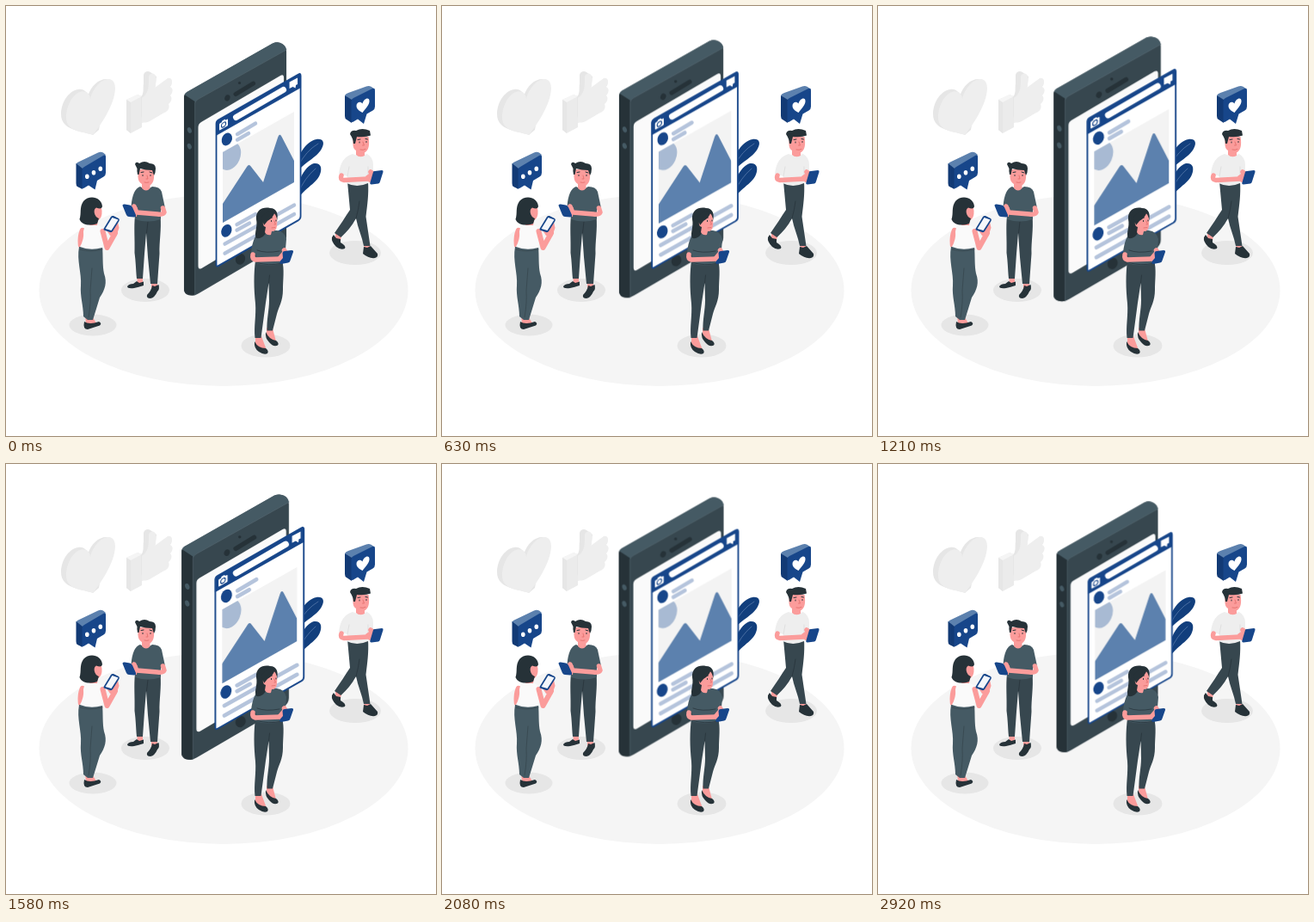
These frames come from a looping animation (500x500 px, 2.96 s). An HTML page:

```html
<!DOCTYPE html>
<html lang="en">
<head>
<meta charset="utf-8">
<title>Social feed</title>
<style>
  html, body { margin: 0; width: 100%; height: 100%; overflow: hidden; background: #fff; }
  svg { display: block; width: 100%; height: 100%; }
  .navy { fill: #17468a; } .blue { fill: #5c81ae; } .pale { fill: #a8bad3; }
  .ink { fill: #263238; } .dark { fill: #37474f; } .slate { fill: #455a64; }
  .skin { fill: #fb9c9b; } .white { fill: #fff; } .shade { fill: #e6e6e6; }
  .line { fill: none; stroke-linecap: round; stroke-linejoin: round; }
  .arm { stroke: #fb9c9b; }
  .bar { stroke: #b5c4dc; stroke-width: 4.4; }
  .face { stroke: #263238; stroke-width: 1; }
  .blush { stroke: #e5716f; stroke-width: .9; }
  .fold { stroke: #263238; stroke-width: .7; }
  #device { transform-origin: 266.5px 185.5px; animation: beat 1.48s linear infinite; }
  @keyframes beat {
    0%    { transform: scale(1); }
    11.8% { transform: scale(1.085); animation-timing-function: ease-in; }
    40.5% { transform: scale(1.025); animation-timing-function: ease-out; }
    57.4% { transform: scale(.992); }
    72.3% { transform: scale(1.069); animation-timing-function: ease-in-out; }
    98.3% { transform: scale(.991); }
    100%  { transform: scale(1); }
  }
</style>
</head>
<body>
<svg viewBox="0 0 500 500">
  <defs>
    <clipPath id="photo"><path d="M252 170 335 123V205L252 252Z"/></clipPath>
  </defs>

  <ellipse cx="253" cy="330.5" rx="214.5" ry="111.5" fill="#f5f5f5"/>
  <g class="shade">
    <ellipse cx="101" cy="371" rx="27.5" ry="12.5"/>
    <ellipse cx="162" cy="330.5" rx="28" ry="13.5"/>
    <ellipse cx="302" cy="395" rx="28.5" ry="13.5"/>
    <ellipse cx="406" cy="287" rx="30" ry="14"/>
  </g>

  <!-- grey heart and thumb -->
  <path d="M64 126C64 111 74 98 84 97 91 96 94 100 95 105 99 92 109 84 118 85L108 144 101 150C88 145 64 145 64 126Z" fill="#e6e6e6"/>
  <path d="M70 130C70 114 79 101 88 99.500 94 98.500 97 102 98 108 101 95 111 85 119 85 126 85 128 92 126.500 101 124 117 112 136 101 150 91 146 70 147 70 130Z" fill="#eee"/>
  <path d="M140 109 153 103 158 105V141L145 148 140 144Z" fill="#ebebeb"/>
  <path d="M140 109 153 103 158 105 145 112Z" fill="#f5f5f5"/>
  <path d="M140 109 145 112V148L140 144Z" fill="#e6e6e6"/>
  <path d="M157 106C161 101 159 95 160 90V80C161 76 165 75 168 77L175 82 173 98 157 130Z" fill="#e6e6e6"/>
  <path d="M158 107C165 102 166 95 166 88V82C167 78 173 77 174 82 175 87 174 92 173 95L188 84C193 82 195 89 191 94 195 96 194 101 191 104 194 107 192 112 189 114 191 118 188 123 184 124L167 134C164 136 161 135 158 136Z" fill="#eee"/>

  <!-- leaves -->
  <g fill="#123f7d">
    <path d="M336 196C337 174 349 157 361 155 369 154 371 159 367 166 361 177 347 181 336 196Z"/>
    <path d="M334 232C337 206 347 186 358 183 366 182 368 188 365 196 360 208 346 211 334 232Z"/>
  </g>
  <path class="line" stroke="#7f9bc4" stroke-width=".5" d="M340 186Q348 169 363 160M340 217Q347 200 360 189"/>

  <g id="device">
    <!-- handset -->
    <path class="dark" d="M207 106Q207 102 211 100L310 43.500Q316 41 321 44 326 47 326 53V268Q326 274 320 278L224 334Q218 338 211 335 207 333 207 329Z"/>
    <path class="slate" d="M207.500 103.500Q208 101 212 99L310 43.500Q316 41 321 44 325 46 326 51L223 108.500Q220 110 219.500 113Z"/>
    <path class="ink" d="M207 106Q207 104 208 103.500L219.500 111V336Q213 337 210 335 207 333 207 329Z"/>
    <path class="line" d="M219.700 336V113Q220 110 224 108L326 51" stroke="#5d6e77" stroke-width=".5"/>
    <g class="slate"><ellipse cx="213.200" cy="144.500" rx="2.400" ry="3.500" transform="rotate(-20 213 144)"/><ellipse cx="213.200" cy="163.200" rx="2.400" ry="3.500" transform="rotate(-20 213 163)"/></g>
    <path d="M223.500 141Q223.500 137 227 135L319 81Q323 79 323 83V248L228 304.500Q223.500 307 223.500 302Z" fill="#fafafa"/>
    <path class="line" d="M267 102.500 287.500 90" stroke="#263238" stroke-width="5"/>
    <g class="ink"><ellipse cx="257.300" cy="106.800" rx="3" ry="3.700" transform="rotate(25 257 107)"/><circle cx="271.500" cy="89.500" r="1.600"/><ellipse cx="272.500" cy="294" rx="5.500" ry="6.500" transform="rotate(25 272 294)"/></g>

    <!-- feed panel -->
    <path d="M244.500 137Q244.500 134 247 132.500L340 79.500Q342.500 78 342.500 81V244.500Q342.500 247.500 340 249L247 302Q244.500 303.500 244.500 300.500Z" fill="#fff" stroke="#17468a" stroke-width="1.800"/>
    <path class="navy" d="M244 136Q244 134 247 132.500L340 79.500Q343 78 343 81V95L244 151Z"/>
    <path class="line" d="M267.500 129.500 322.500 97.500" stroke="#fff" stroke-width="7"/>
    <g transform="matrix(1 -.56 0 1 253 137)">
      <path class="white" d="M-4-3H-2.500L-1.500-4.500H1.500L2.500-3H4Q5-3 5-2V4Q5 5 4 5H-4Q-5 5-5 4V-2Q-5-3-4-3Z"/>
      <circle cy="1" r="2.600" fill="none" stroke="#17468a" stroke-width="1.100"/>
    </g>
    <path class="white" d="M329.500 88.500 339 83.500V91L337 92 336.500 95.500 333.500 94 329.500 96Z"/>
    <ellipse class="navy" cx="256.800" cy="155" rx="5.800" ry="7.700" transform="rotate(24 257 155)"/>
    <path class="line bar" d="M269 149 290 136.500M269 155.500 282 148"/>
    <path d="M252 170 335 123V205L252 252Z" fill="#f3f3f3"/>
    <g clip-path="url(#photo)">
      <ellipse class="pale" cx="260" cy="174.500" rx="12" ry="17" transform="rotate(24 260 175)"/>
      <path class="blue" d="M250 233 280 187Q282.500 183 285 187L299 205 316 153Q318 147 320.500 152L337 184V206L250 254Z"/>
    </g>
    <ellipse class="navy" cx="256.500" cy="261.500" rx="5.800" ry="7.700" transform="rotate(24 257 261)"/>
    <path class="line bar" d="M268.500 254 290 242M268.500 260.500 283 252.500M254.500 276.500 335 231.500M254.500 287.500 335 242"/>
  </g>

  <!-- chat bubble -->
  <path class="blue" d="M81.500 184Q82 182 85 181L107 170.500Q110 169 113 170.500L116 173 89 190Z"/>
  <path d="M81.500 183 89 189V213L83 210Q81.500 209 81.500 206Z" fill="#123a75"/>
  <path class="navy" d="M88.500 191Q88.500 188 91 187L113 174Q116 172 116 175V194Q116 197 113.500 198.500L106 203 103.500 213.500 96 208.500 91 211.500Q88.500 213 88.500 210Z"/>
  <g class="white"><ellipse cx="94.300" cy="198.300" rx="2.300" ry="2.800"/><ellipse cx="102" cy="193.800" rx="2.300" ry="2.800"/><ellipse cx="109.800" cy="189.300" rx="2.300" ry="2.800"/></g>

  <!-- like bubble -->
  <path class="blue" d="M394 104Q395 102 398 101L419 93.500Q422 92.500 425 94L429 97 402 111Z"/>
  <path d="M394 104 402 109V136L396 132Q394 131 394 128Z" fill="#123a75"/>
  <path class="navy" d="M401.500 111Q401.500 108 404 107L426 96Q429 95 429 98V117Q429 120 426.500 121.500L419.500 125.500 416 137 409 131.500 404 134.500Q401.500 136 401.500 133Z"/>
  <path class="white" d="M414.500 124C411 122 407.500 120 407.500 116 407.500 112 412 110 414.500 113.500 416 107.500 422 105.500 422.500 110 423 115 418 119 414.500 124Z"/>

  <!-- woman seen from behind -->
  <path class="line arm" stroke-width="6.500" d="M89 261Q86 268 87 278"/>
  <path class="skin" d="M92 358 93 370 106 370 100 361Z"/>
  <path class="ink" d="M91 367Q97 371 108 367 112 369 109 371.500L95 376Q89 376 91 367Z"/>
  <path class="slate" d="M85 280H112C113 291 112 301 114 311 118 322 115 330 109 339L101 365H95L90 361C90 348 86 338 87 325 88 310 82 296 85 280Z"/>
  <path class="line" stroke="#37474f" stroke-width=".8" d="M96 362Q99 345 98 331L100 305M86 283Q99 287 112 283"/>
  <path d="M92 254Q101 250 109 256L115 261 112 281Q98 285 86 280Q91 271 90 262Z" fill="#fafafa"/>
  <path class="line arm" stroke-width="6" d="M112.500 262 117.500 281 127 264"/>
  <path class="skin" d="M115 258 122 253 130 251 131.500 258 128 268 121 267Z"/>
  <path class="navy" d="M113.500 259 122 245Q123 243.500 125 244L131 247Q132.500 248 131.500 250L124 262Q123 263.500 121 263L115 261Q113 260.500 113.500 259Z"/>
  <path d="M115.500 259 123.500 246 130.500 248.500 122.500 261Z" fill="#f5f7fb"/>
  <path class="skin" d="M100 232Q111 229 111.500 238 112 247 107 249L106 255H97Z"/>
  <path class="ink" d="M112 233C111 222 97 219 90 227 85 234 88 241 85.500 248 88 255 98 256 106 253L108 247C102 245 101 236 105 234.500 109 236 111 236 112 233Z"/>

  <!-- man beside the handset -->
  <path class="skin" d="M152 312H159V322L153 323ZM169 318H176L176 327 169 328Z"/>
  <path class="ink" d="M152 320 155 322 160 320.500V325Q154 327 149 328 141 329 141 326 143 323 148 323ZM170 325 173 326 177.500 324Q179 329 176 332 173 339 168 340 163 340 164 336 169 331 170 325Z"/>
  <path class="dark" d="M150 244H179.500C181 260 178 274 178.500 288L176 323H168L165 292 163 264 161 288 159 317H152C151 306 151 298 149.500 287 150 270 148.500 258 150 244Z"/>
  <path class="line fold" d="M163.500 264 165 251"/>
  <path class="slate" d="M156 210Q163 215 170 210 179 210 181 216L185 235 180 237V248Q165 253 150 248L150 237 145.500 233Q147 213 156 210Z"/>
  <path class="line arm" stroke-width="5.500" d="M182.500 235 184 240Q183 243 176 242L152 240M149 233 152 240"/>
  <path class="skin" d="M143 238 148 230 153 235 152 245 146 244Z"/>
  <path class="navy" d="M135.500 232Q135.500 230 138 230.500L144 231.500Q146 232 147 234L151 243Q151.500 245.500 149 245.500L143 245Q141 245 140 243Z"/>
  <path class="skin" d="M154 190H171.500C173 199 172 206 167.500 208.500V212Q163 217 158 212V207C153 204 153 199 154 190Z"/>
  <path class="ink" d="M150 184Q151 180 155 183 161 179 167 183 174 183 174 189 174 194 172 197L170 191Q162 191 156 189L154.500 196 153 196Q152 192 152.500 189Z"/>
  <path class="line face" d="M159 196.500V197.500M168 196.500V197.500M157 193.500 160 193M167 193 170 194"/>
  <path class="line blush" d="M164 197 165 201H163M161 205Q164 206 166 205"/>

  <!-- woman in front -->
  <path class="skin" d="M290 384H297L303 400 299 402 290 396ZM303 374 310 375 314 390 308 391 303 385Z"/>
  <path class="ink" d="M289 390Q293 398 302 398 306 401 304 404 300 406 294 402 288 398 289 390ZM302 379Q306 388 314 389 318 392 316 394.500 311 397 306 391 301 386 302 379Z"/>
  <path class="dark" d="M290 296H321C324 306 322 318 322 330 322 343 317 350 315 358L310 377.500H303.500C303 364 306 354 306 342L305.500 322 302 345 296.500 386H289.500C288 373 291 360 290 346 288 328 288 311 290 296Z"/>
  <path class="line fold" d="M305.500 322 306.500 313"/>
  <path class="slate" d="M298 261H315Q324 262 326 271L325 283 321 286 322 299Q306 304 290 299L291 290 285 287Q287 265 298 261Z"/>
  <path class="line fold" d="M292 284Q302 288 318 285M291 298Q305 303 321 299"/>
  <path class="line arm" stroke-width="5.500" d="M287 289Q286 294 290 295L320 294M323.500 284 326 288"/>
  <path class="skin" d="M316 292 321 286 328 289 327 298 319 298Z"/>
  <path class="navy" d="M321.500 287Q322 285 324 285L332 284Q334.500 284 334 286L330.500 296Q330 298 328 298.500L320 300Q317.500 300 318.500 297L322 293Z"/>
  <path class="ink" d="M291 248C290 237 299 233 307 235 315 235 317 242 315 250L304 262C300 266 299 271 291 270 288 264 293 257 291 248Z"/>
  <path class="skin" d="M299 251Q300 246 304 249 308 246 311 240 316.500 245 315 256 314 262.500 309 262L308 266Q303 267 301 263L302 257Q298 256 299 251Z"/>
  <path class="ink" d="M297 246Q303 237 313 239 310 247 304 250L300 255Z"/>
  <path class="line face" d="M308.500 249.500V250.500M314 249V250M307 246.500 309.500 246"/>
  <path class="line blush" d="M312 250 313.500 254H312M309 258 313 257.500"/>

  <!-- walking man -->
  <path class="skin" d="M383 262 390 267 389 273 383 272ZM416 276H423L423 284 417 284Z"/>
  <path class="ink" d="M381 266 384 270 389 271 389 275Q396 279 394 282 389 284 384 280 378 274 379 269ZM416 280 420 281 424 279 432 288Q433 292 429 293 422 294 415 288Z"/>
  <path class="dark" d="M397 204H421C422 219 420 232 418.500 245L423.500 279H416C414 268 409 258 407 247 402 256 396 263 389.500 269L382 264C389 254 394 246 400 237Z"/>
  <path class="line fold" d="M407 247Q410 236 411 227"/>
  <path d="M403 172Q412 176 420 172 427 176 427 185L427 196 421 199V206Q408 212 396 206L397 198 387 195Q389 176 403 172Z" fill="#eee"/>
  <path class="line" stroke="#d8d8d8" stroke-width=".7" d="M397 198 399 187M421 198V187"/>
  <path class="line arm" stroke-width="5.500" d="M390 197Q388 202 393 202.500L421 201M424 193 428 196"/>
  <path class="skin" d="M418 198 425 193 432 196 430 204 422 205Z"/>
  <path class="navy" d="M427 193Q427 192 429 192L437 191Q439 191 438.500 193L435 204Q434.500 206 433 206.500L425 207.500Q422.500 207 423.500 205Z"/>
  <path class="skin" d="M404 152H421.500C423 161 422 168 417 170.500V174Q411 177 407 173V168C403 166 403 160 404 152Z"/>
  <path class="ink" d="M400 149Q401 144 407 145 414 141 423 145L424 150.500Q418 153 408 152L406 160 404 160Q404 155 400 149Z"/>
  <path class="line face" d="M411 158V159M419 157.500V158.500M409 155.500 412 155M418 154.500 420.500 155"/>
  <path class="line blush" d="M415 158 416.500 162H414.500M412 167Q415 168 418 166.500"/>
</svg>
</body>
</html>
```
